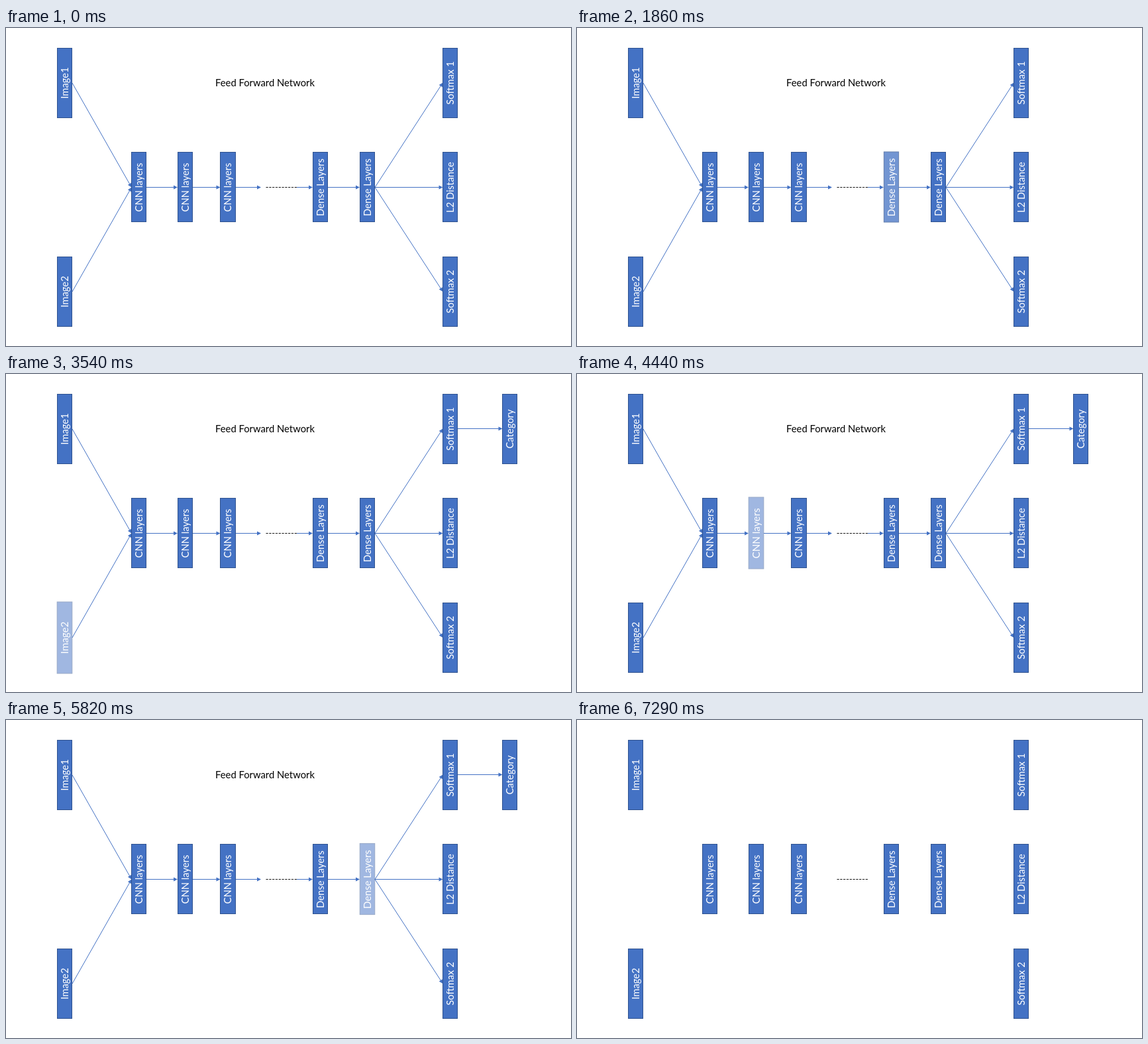
An HTML page that plays this animation: 853x480 px, repeating every 8 s.

```html
<!DOCTYPE html>
<html lang="en">
<head>
<meta charset="utf-8">
<title>Feed Forward Network</title>
<style>
  html, body { margin: 0; width: 100%; height: 100%; overflow: hidden; background: #fff; }
  svg { display: block; width: 853px; height: 480px; }
  text { font: 14.8px Lato, Carlito, "Open Sans", sans-serif; text-anchor: middle; }
  .box rect { fill: #4472c4; stroke: #2f528f; }
  .box text { fill: #fff; }
  .arrow line { stroke: #4472c4; }
  .arrow path { fill: #4472c4; }
  .dots { stroke: #111; stroke-dasharray: 3.2 1.6; }
</style>
</head>
<body>
<svg id="stage" viewBox="0 0 853 480"></svg>
<script>
const LOOP = 8000, STEP = 60, PULSE = 450;
const CLEAR_AT = 7290;
const TOP = 83, MID = 240.5, LOW = 398;
const stage = document.getElementById('stage');

function add(parent, tag, attrs, label) {
  const el = document.createElementNS('http://www.w3.org/2000/svg', tag);
  for (const key in attrs) el.setAttribute(key, attrs[key]);
  if (label) el.textContent = label;
  parent.append(el);
  return el;
}

function box(label, left, cy, width = 22) {
  const cx = left + 0.5 + width / 2;
  const el = add(stage, 'g', { class: 'box' });
  add(el, 'rect', { x: left + 0.5, y: Math.floor(cy) - 52.5, width, height: 105 });
  add(el, 'text', { transform: `translate(${left + 16.8} ${cy}) rotate(-90)` }, label);
  return { el, cx, cy: Math.floor(cy) };
}

function arrow(parent, x1, y1, x2, y2) {
  const el = add(parent, 'g', { class: 'arrow' });
  const angle = Math.atan2(y2 - y1, x2 - x1);
  const turn = angle * 180 / Math.PI;
  add(el, 'line', { x1, y1, x2: x2 - 4 * Math.cos(angle), y2: y2 - 4 * Math.sin(angle) });
  add(el, 'path', { d: 'M0 0L-6 -3V3Z', transform: `translate(${x2} ${y2}) rotate(${turn})` });
}

// Wiring and title, hidden together when the scene clears
const links = add(stage, 'g', {});
add(links, 'text', { x: 391, y: 88 }, 'Feed Forward Network');
[
  [100, TOP, 189.5, MID], [100, LOW, 189.5, MID],
  [212, MID, 259, MID], [282, MID, 323.5, MID], [347, MID, 385, MID],
  [439, MID, 463, MID], [486, MID, 534, MID],
  [557, MID, 659.5, TOP - 0.5], [557, MID, 659.5, MID], [557, MID, 659.5, LOW]
].forEach(ends => arrow(links, ...ends));
add(stage, 'line', { class: 'dots', x1: 392.5, y1: MID, x2: 440, y2: MID });

const image1 = box('Image1', 77, TOP);
const image2 = box('Image2', 77, LOW);
const layers = [
  box('CNN layers', 189, MID),
  box('CNN layers', 259, MID),
  box('CNN layers', 323, MID, 23),
  box('Dense Layers', 463, MID),
  box('Dense Layers', 534, MID)
];
const softmax1 = box('Softmax 1', 659, TOP);
box('L2 Distance', 659, MID);
const softmax2 = box('Softmax 2', 659, LOW);

function result(cy, at) {
  const group = add(stage, 'g', {});
  arrow(group, 682, cy - 0.5, 749.5, cy - 0.5);
  group.append(box('Category', 749, cy).el);
  return { group, at };
}
const results = [result(TOP, 3180), result(LOW, 6420)];

// Each pass pulses its boxes one after another
const passes = [
  { start: 15, chain: [image1, ...layers, softmax1] },
  { start: 3215, chain: [image2, ...layers, softmax2] }
];

function pulse({ el, cx, cy }, p) {
  const fade = 0.5 * Math.min(1, p / 0.2, (1 - p) / 0.2);
  const scale = 1 + 0.05 * (1 - Math.abs(2 * p - 1));
  el.setAttribute('opacity', 1 - fade);
  el.setAttribute('transform', `translate(${cx} ${cy}) scale(${scale}) translate(${-cx} ${-cy})`);
}

function rest({ el }) {
  el.removeAttribute('opacity');
  el.removeAttribute('transform');
}

const show = (el, on) => el.setAttribute('visibility', on ? 'visible' : 'hidden');

function draw(time) {
  const t = Math.floor(time / STEP) * STEP;
  const open = time < CLEAR_AT;
  show(links, open);
  results.forEach(r => show(r.group, open && t >= r.at));
  [image1, image2, ...layers, softmax1, softmax2].forEach(rest);
  for (const { start, chain } of passes) {
    const pos = (t - start) / PULSE;
    const active = chain[Math.floor(pos)];
    if (active) pulse(active, pos - Math.floor(pos));
  }
}

const begin = performance.now();
function tick() {
  draw((performance.now() - begin) % LOOP);
  requestAnimationFrame(tick);
}
tick();
</script>
</body>
</html>
```
